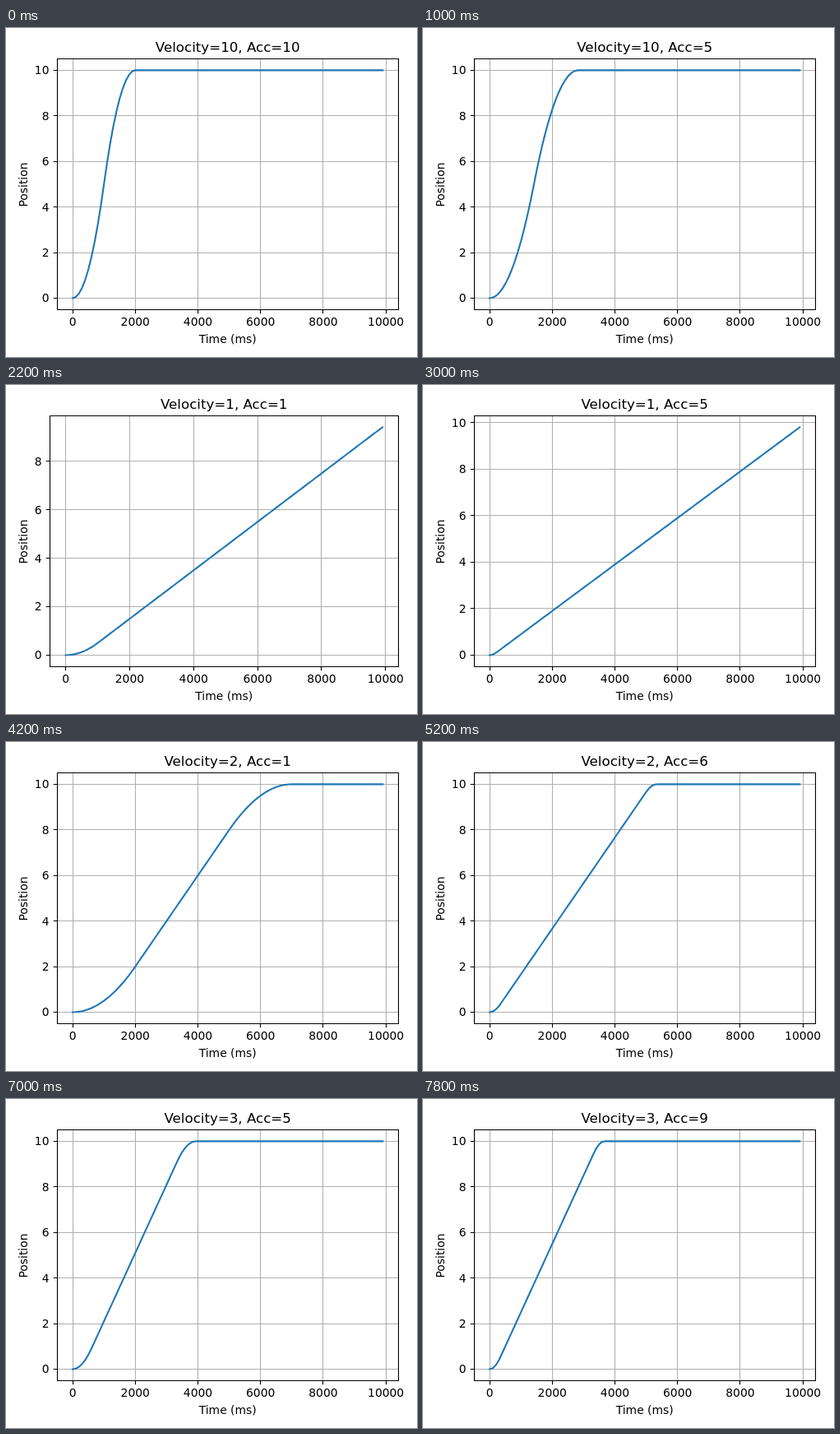
Recreate the animation shown at these times as an HTML page. Size 500 px wide and 400 px high, loop 8000 ms.

```html
<!DOCTYPE html>
<html lang="en">
<head>
<meta charset="utf-8">
<title>Motion profile</title>
<style>
  html, body { margin: 0; width: 100%; height: 100%; overflow: hidden; background: #fff; }
  svg { display: block; width: 500px; height: 400px; }
  text { font: 13.89px "DejaVu Sans", sans-serif; fill: #000; text-anchor: middle; }
  .title { font-size: 16.67px; }
  .end { text-anchor: end; }
  .grid { stroke: #b0b0b0; stroke-width: 1.11; }
  .axis { stroke: #000; stroke-width: 1.11; fill: none; }
  .curve { stroke: #1f77b4; stroke-width: 2.08; fill: none; stroke-linecap: square; stroke-linejoin: round; }
</style>
</head>
<body>
<svg id="chart" viewBox="0 0 500 400"></svg>
<script>
const STEP_MS = 200, STEPS = 40;
const DISTANCE = 10, SAMPLES = 100, SAMPLE_MS = 100;
const TOP = 37.5, BOTTOM = 342.3, RIGHT = 477.2;
const MARGIN = 0.05 / 1.1;
const chart = document.getElementById('chart');

const snap = v => Math.floor(v) + 0.5;
const path = (kind, d) => `<path class="${kind}" d="${d}"/>`;
const label = (x, y, text, kind = '') => `<text class="${kind}" x="${x}" y="${y}">${text}</text>`;

// Trapezoidal (or triangular) velocity profile covering DISTANCE.
function position(t, velocity, acc) {
  const peak = Math.min(velocity, Math.sqrt(DISTANCE * acc));
  const ramp = peak / acc;
  const total = DISTANCE / peak + ramp;
  if (t >= total) return DISTANCE;
  if (t < ramp) return acc * t * t / 2;
  if (t <= total - ramp) return peak * (t - ramp / 2);
  return DISTANCE - acc * (total - t) ** 2 / 2;
}

function draw(step) {
  const velocity = Math.floor(step / 10) || 10;
  const acc = step % 10 || 10;
  const values = Array.from({ length: SAMPLES },
    (_, i) => position(i * SAMPLE_MS / 1000, velocity, acc));
  const max = values[SAMPLES - 1];
  const topTick = 2 * Math.floor(max * 1.05 / 2);

  // One-digit tick labels leave more room for the plot.
  const left = topTick < 10 ? 53.3 : 62.2;
  const width = RIGHT - left, height = BOTTOM - TOP;
  const scaleX = ms => left + width * (MARGIN + ms / ((SAMPLES - 1) * SAMPLE_MS) / 1.1);
  const scaleY = v => BOTTOM - height * (MARGIN + v / max / 1.1);
  const [l, r, t, b] = [left, RIGHT, TOP, BOTTOM].map(snap);
  const middle = (left + RIGHT) / 2;

  let grid = '', ticks = '', labels = '';
  for (let ms = 0; ms <= 10000; ms += 2000) {
    const x = scaleX(ms), line = snap(x);
    grid += `M${line} ${t}V${b}`;
    ticks += `M${line} ${b}v4.86`;
    labels += label(x, 362, ms);
  }
  for (let v = 0; v <= topTick; v += 2) {
    const y = scaleY(v), line = snap(y);
    grid += `M${l} ${line}H${r}`;
    ticks += `M${l} ${line}h-4.86`;
    labels += label(left - 9.72, Math.round(y + 5), v, 'end');
  }
  const points = values.map((v, i) =>
    `${scaleX(i * SAMPLE_MS).toFixed(2)} ${scaleY(v).toFixed(2)}`);

  chart.innerHTML =
    path('grid', grid) +
    path('axis', ticks) +
    path('curve', 'M' + points.join('L')) +
    path('axis', `M${l} ${t}H${r}V${b}H${l}Z`) +
    labels +
    label(middle, 29, `Velocity=${velocity}, Acc=${acc}`, 'title') +
    label(middle, 383, 'Time (ms)') +
    '<text transform="translate(26 190.5) rotate(-90)">Position</text>';
}

let shown = -1;
const start = performance.now();
function tick() {
  const step = Math.floor((performance.now() - start) / STEP_MS) % STEPS;
  if (step !== shown) draw(shown = step);
  requestAnimationFrame(tick);
}
tick();
</script>
</body>
</html>
```
